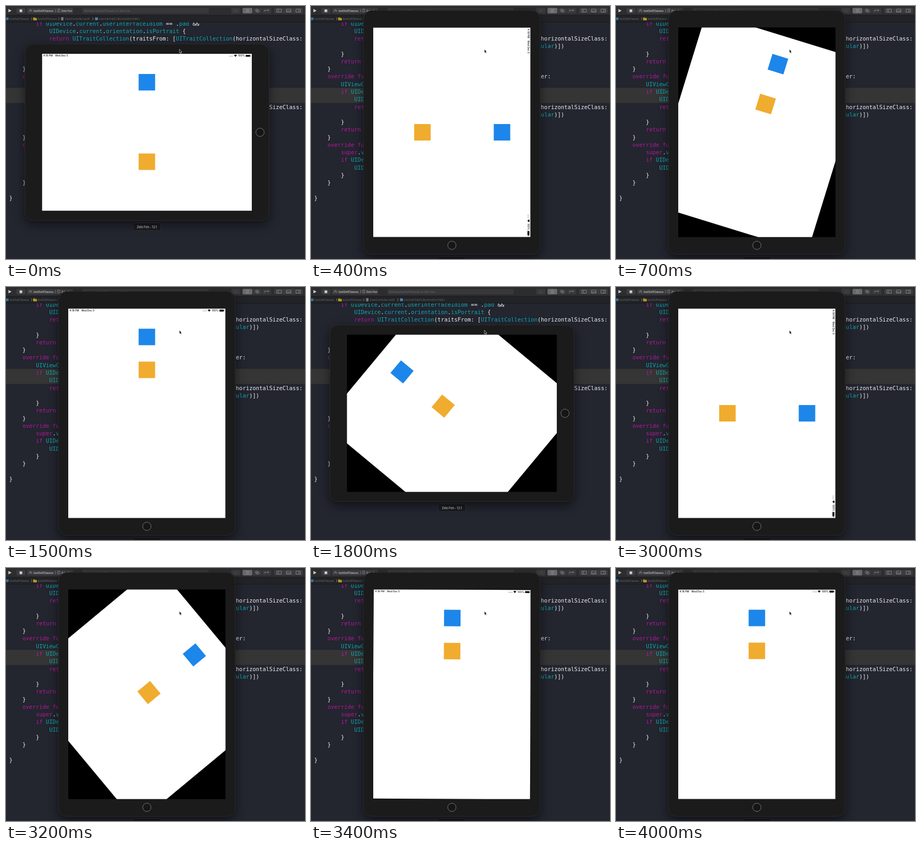
Write an HTML page that moves like this. It is 562 by 476 pixels and loops after 4.4 s.

```html
<!DOCTYPE html>
<html lang="en">
<head>
<meta charset="utf-8">
<title>Rotating tablet simulator</title>
<style>
  html, body { margin: 0; width: 100%; height: 100%; overflow: hidden; background: #23252f; }
  svg { display: block; }
  text { font: 5px Inter, sans-serif; white-space: pre; }
  #code text { font: 10.42px "DejaVu Sans Mono", monospace; fill: #f2f2f2; }
  #code .key { fill: #b4189c; }
  #code .type { fill: #0fa9b0; }
  #bar text { fill: #6c6c70; }
  #bar .bright { fill: #d4d4d6; font-weight: 500; }
  #status text { font-size: 4.7px; font-weight: 500; fill: #111; }
  .line { fill: none; stroke: #929295; stroke-width: .8; }
  #device { filter: drop-shadow(0 7px 9px rgba(0, 0, 0, .5)); }
</style>
</head>
<body>
<svg width="562" height="476" viewBox="0 0 562 476">
  <defs>
    <clipPath id="screen"><rect class="turn" x="-147.8" y="-197.2" width="295.6" height="394.4"/></clipPath>
  </defs>
  <rect width="562" height="476" fill="#23252f"/>
  <rect y="154" width="562" height="28.5" fill="#353535"/>
  <g id="code"></g>

  <g id="bar">
    <rect width="562" height="18" fill="#2d2d2f"/>
    <rect y="17.5" width="562" height="13" fill="#222327"/>
    <path d="M0 17.5H562M0 30.5H562" stroke="#18181a" stroke-width=".8"/>
    <path d="M4.5 5.5L10.5 8.8L4.5 12Z" fill="#c8c8ca"/>
    <rect x="19.5" y="3.5" width="17" height="10.5" rx="2" fill="#3c3c3e"/>
    <rect x="25.5" y="6.5" width="5" height="5" fill="#d0d0d2"/>
    <rect x="39.5" y="3.5" width="86.5" height="10.5" rx="2" fill="#3c3c3e"/>
    <path class="line" d="M43 10.5L46 6L49 10.5M44 9H48.5"/>
    <text class="bright" x="52" y="10.7">testSelfClasses</text>
    <path class="line" d="M92.5 6L94 8.8L92.5 11.5M97.5 5.8H101V11H97.5Z"/>
    <text class="bright" x="104" y="10.7">Zelo Fen</text>
    <rect x="143.5" y="3.5" width="237.5" height="10.5" rx="2" fill="#38383a"/>
    <text x="147" y="10.7">Running testSelfClasses on Zelo Fen</text>
    <rect x="423.5" y="3.5" width="17" height="10.5" rx="2" fill="#3a3a3c"/>
    <text x="429" y="10.7">{ }</text>
    <rect x="444.5" y="3.5" width="18.5" height="10.5" rx="2" fill="#69696c"/>
    <path class="line" d="M451 6.5H457M451 8.8H457M451 11H457"/>
    <rect x="464" y="3.5" width="16.5" height="10.5" fill="#3a3a3c"/>
    <circle class="line" cx="471" cy="8" r="2.3"/>
    <circle class="line" cx="473.5" cy="9.5" r="2.3"/>
    <rect x="481.5" y="3.5" width="17" height="10.5" rx="2" fill="#3a3a3c"/>
    <path class="line" d="M486 10.5V8H493.5M492 6.5L494 8L492 9.5"/>
    <rect x="504" y="3.5" width="54" height="10.5" rx="2" fill="#3c3c3e"/>
    <path class="line" d="M509 6H517.5V11.5H509ZM512 6V11.5M527 6H535.5V11.5H527ZM527 9.5H535.5M545 6H553.5V11.5H545ZM550.5 6V11.5"/>
    <rect y="21.5" width="5" height="5" rx="1" fill="#2f7299"/>
    <text x="7" y="25.8">testSelfClasses</text>
    <path class="line" d="M47.5 21.5L49 24L47.5 26.5M98.5 21.5L100 24L98.5 26.5M162.5 21.5L164 24L162.5 26.5"/>
    <path d="M51 21.5H54L55 22.5H58V27H51Z" fill="#b8941f"/>
    <text x="59.5" y="25.8">testSelfClasses</text>
    <rect x="103.5" y="21" width="4.5" height="6" fill="#77777a"/>
    <text x="110" y="25.8">ViewController.swift</text>
    <rect x="167" y="21" width="6" height="6" rx="1" fill="#27587f"/>
    <text x="168" y="25.7" style="fill:#b8c8d4">M</text>
    <text x="174.5" y="25.8">overrideTraitCollection(forChild:)</text>
  </g>

  <g id="label">
    <rect x="239" width="51.5" height="14.5" rx="2" fill="#1b1c20" stroke="#34353b" stroke-width=".8"/>
    <text x="264.8" y="9.5" text-anchor="middle" style="font-size:5.6px;font-weight:500" fill="#e2e2e2">Zelo Fen - 12.1</text>
  </g>

  <g transform="translate(264.8 237.6)">
    <g id="device"><g class="turn">
      <rect x="-166" y="-229.3" width="332" height="459" rx="16" fill="#1b1b1b" stroke="#2b2b2d"/>
      <circle cy="212.7" r="7.8" fill="#161616" stroke="#77777a"/>
      <rect x="-147.8" y="-197.2" width="295.6" height="394.4"/>
    </g></g>
    <g clip-path="url(#screen)"><g id="view">
      <rect id="page" fill="#fff"/>
      <rect id="blue" x="-15.5" width="31" height="31" fill="#1c86ea"/>
      <rect id="orange" x="-15.5" width="31" height="31" fill="#f0ac2e"/>
      <g id="status">
        <g id="left">
          <text x="2.3" y="5.6">4:18 PM</text>
          <text x="24.7" y="5.6">Wed Dec 5</text>
        </g>
        <g id="right">
          <path d="M-42.5 4.5H-35.5" stroke="#444" stroke-width=".9" stroke-dasharray="1 1"/>
          <path d="M-33.5 2.8Q-30.7 .8 -27.9 2.8L-30.7 6Z" fill="#111"/>
          <text x="-25.6" y="5.6">100%</text>
          <rect x="-11.5" y="2.1" width="8.3" height="3.7" rx=".9" fill="#111"/>
          <rect x="-2.8" y="3.2" width=".8" height="1.5" fill="#111"/>
        </g>
      </g>
    </g></g>
  </g>
  <path d="M326 81.3V88.2L327.5 86.9L328.6 89.3L329.7 88.8L328.7 86.5H330.5Z" fill="#000" stroke="#fff" stroke-width=".6"/>
</svg>
<script>
const $ = id => document.getElementById(id);

// Code listing; the trait check appears twice.
const check = [
  '        if UIDevice.current.userInterfaceIdiom == .pad &&',
  '            UIDevice.current.orientation.isPortrait {',
  '            return UITraitCollection(traitsFrom: [UITraitCollection(horizontalSizeClass:',
  '                .regular), UITraitCollection(verticalSizeClass: .regular)])',
  '        }',
  '        return super.traitCollection',
  '    }'
];
const lines = [
  ...check,
  '    override func overrideTraitCollection(forChild childViewController:',
  '        UIViewController) -> UITraitCollection? {',
  ...check,
  '    override func viewDidLoad() {',
  '        super.viewDidLoad()',
  '        if UIDevice.current.orientation.isPortrait {',
  '            UIDevice.current.orientation',
  '        }',
  '    }',
  '',
  '}'
];
const paint = line => line
  .replace(/&/g, '&amp;').replace(/>/g, '&gt;')
  .replace(/\b(if|return|override|func|super)\b/g, '<tspan class="key">$1</tspan>')
  .replace(/\b(UI\w+|current|userInterfaceIdiom|orientation|isPortrait|pad|regular|viewDidLoad)\b/g,
    '<tspan class="type">$1</tspan>');
$('code').innerHTML = lines.map((line, i) => {
  const indent = line.search(/\S|$/);
  return `<text x="${6 + indent * 6.27}" y="${36.6 + i * 14.27}">${paint(line.trim())}</text>`;
}).join('');

const LOOP = 4400, STEP = 100, TURN = 400, DELAY = 15;
const turns = [
  { at: -1400, portrait: false },
  { at: 400, portrait: true },
  { at: 1600, portrait: false },
  { at: 3000, portrait: true }
];
const ease = x => (1 - Math.cos(Math.PI * Math.min(1, Math.max(0, x)))) / 2;
const mix = (a, b, p) => a + (b - a) * p;
const set = (id, attrs) => {
  for (const name in attrs) $(id).setAttribute(name, attrs[name]);
};

function draw() {
  // Lead by one display refresh so each step lands on time.
  const t = Math.floor((performance.now() + 16) / STEP) * STEP % LOOP;
  const { at, portrait } = turns.filter(turn => t >= turn.at).pop();
  const p = ease((t - at - DELAY) / TURN);
  const tall = portrait ? p : 1 - p;
  const w = mix(394.4, 295.6, tall), h = mix(295.6, 394.4, tall);

  for (const el of document.querySelectorAll('.turn'))
    el.setAttribute('transform', `rotate(${portrait ? 0 : -90})`);
  set('label', { transform: `translate(0 ${portrait ? 471.5 : 408})` });
  set('view', { transform: `rotate(${(portrait ? 90 : -90) * (1 - p)})` });
  set('page', { x: -w / 2, y: -h / 2, width: w, height: h });
  set('blue', { y: -h / 2 + 38.1 });
  set('orange', { y: -h / 2 + mix(187.7, 100, tall) });
  set('left', { transform: `translate(${-w / 2} ${-h / 2})` });
  set('right', { transform: `translate(${w / 2} ${-h / 2})` });
  requestAnimationFrame(draw);
}
draw();
</script>
</body>
</html>
```
